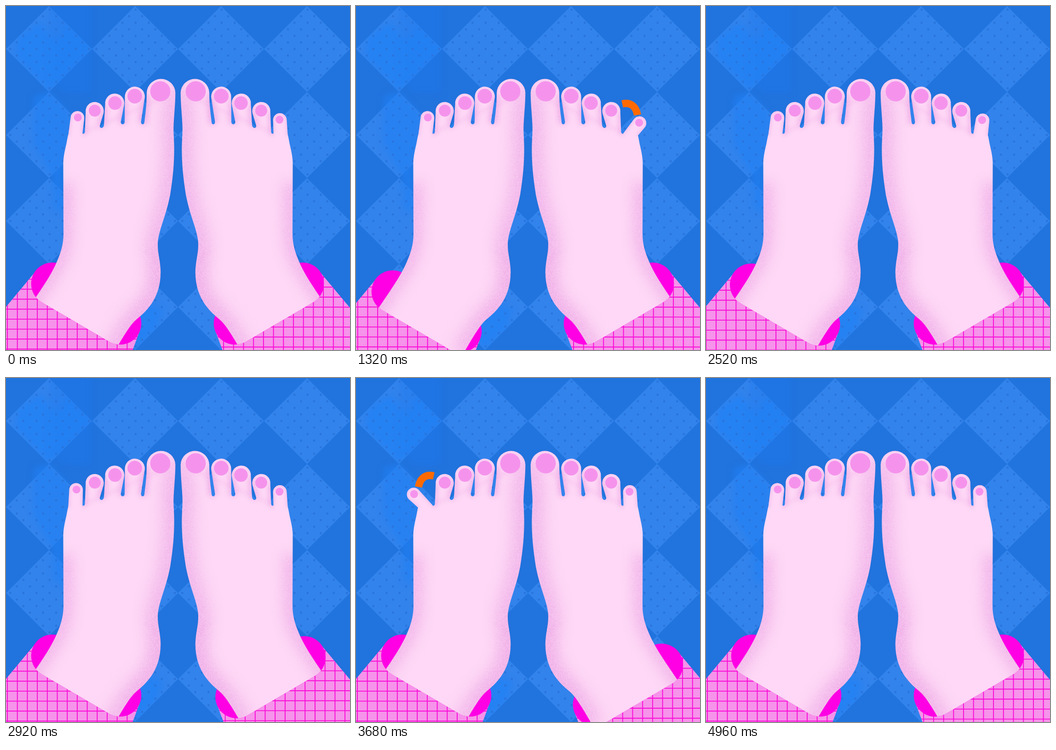
Recreate the animation shown at these times as an HTML page with a canvas. Size 748x748 px, loop 5000 ms.

```html
<!DOCTYPE html>
<html lang="en">
<head>
<meta charset="utf-8">
<title>Toes</title>
<style>
html, body { margin: 0; width: 100%; height: 100%; overflow: hidden; background: #2173dd; }
canvas { display: block; width: 748px; height: 748px; }
</style>
</head>
<body>
<canvas id="stage" width="748" height="748"></canvas>
<script>
const SIZE = 748, LOOP = 5000, TAU = Math.PI * 2, RAD = Math.PI / 180;
const SKIN = '#fed8f6', SHADE = '#eda9e5', NAIL = '#f593ec';
const CLOTH = '#f693ea', LINE = '#fa0ad8', HOT = '#ff00e4', ORANGE = '#ff6a00';
const ctx = document.getElementById('stage').getContext('2d');

// Everything is described for the left foot; the right one is mirrored.
const OUTER = 'M136 279C134 283 133 292 131 301C128 314 125 326 124.5 342' +
  'L125 495C125 520 118 540 108 562C98 584 82 608 65 633L20 700';
const INNER = 'L245 736C258 714 270 694 282 683C300 668 336.3 640 336.3 578' +
  'C336 555 330 540 330 520C330 490 347 462 357 410C363.5 370 365.7 340 365.7 310' +
  'C365.7 290 364 277 364.3 265C365 240 368.3 215 368.3 188';
const TOES = 'A31.2 31.2 0 0 0 306 188C306 215 303 235 301 252' +
  'C301 259 293.5 259 293.5 252L301.3 202A21.7 21.7 0 1 0 258.5 198' +
  'L258 252C258 259 249 259 249.5 252L256.4 217A20.8 20.8 0 1 0 215.7 213' +
  'L213 259C212 267 203 267 204 260L211.8 234A19.7 19.7 0 1 0 173.3 230' +
  'L171.5 274C171 279 166 278 166 276Z';
const BODY = new Path2D(OUTER + 'L20 800L213 790' + INNER + TOES);

// path, width, blur, alpha
const SHADING = [
  ['M126 385L125 495C125 520 118 540 108 562L20 700', 40, 14, .62],
  ['M232 757' + INNER, 48, 16, .66],
  ['M282 683C300 668 336 640 336 578C336 555 330 540 330 520', 42, 16, .3],
  ['M306 195C306 215 303 235 301 256M293.5 252L301 203', 14, 6, .6],
  ['M258.5 205L258 254M249.5 254L256.5 215', 13, 6, .55],
  ['M216 218L213 260M204 260L211.5 231', 13, 6, .55],
  ['M173.5 232L171.5 274L166 276', 11, 5, .5],
  ['M368.3 188' + TOES, 6, 4, .3]
];
const NAILS = [[335.5, 185.5, 22], [280, 196, 16], [237, 211, 14.7], [193, 227.5, 13]];

const sides = [
  { flip: false, r: 49.8, swing: [0, 37], tilt: [-4, 45], shift: 0, pull: [24.3, 19.7], grid: [3, 637.5],
    cuff: [0, 1740, 1740, 2740], toe: [2790, 3450, 4480, 4990], arc: [3120, 3660, 4250, 4700] },
  { flip: true, r: 45.2, swing: [3.7, 31.8], tilt: [0, 38], shift: 2, pull: [26, 26], grid: [12.5, 633],
    cuff: [2500, 4240, 4240, 4990], toe: [340, 1160, 2100, 2740], arc: [340, 1080, 2100, 2540] }
];

const ease = (t, a, b) => (1 - Math.cos(Math.PI * Math.min(1, Math.max(0, (t - a) / (b - a))))) / 2;
const pulse = (t, [a, b, c, d]) => ease(t, a, b) - ease(t, c, d);
const mix = ([a, b], p) => a + (b - a) * p;

function layer(paint) {
  const c = document.createElement('canvas');
  c.width = c.height = SIZE;
  paint(c.getContext('2d'));
  return c;
}

function disc(g, x, y, r, color) {
  g.fillStyle = color;
  g.beginPath();
  g.arc(x, y, r, 0, TAU);
  g.fill();
}

const floor = layer(g => {
  const step = 187, half = 93.5;
  g.fillStyle = '#2173dd';
  g.fillRect(0, 0, SIZE, SIZE);
  const tiles = new Path2D();
  for (let y = half; y < SIZE; y += step)
    for (let x = half; x < SIZE; x += step)
      tiles.addPath(new Path2D(`M${x} ${y - half}l${half} ${half}l${-half} ${half}l${-half} ${-half}z`));
  g.fillStyle = '#3283ec';
  g.fill(tiles);

  // brighter washes of paint
  g.save();
  g.filter = 'blur(7px)';
  g.fillStyle = 'rgba(30,120,240,.35)';
  g.fill(new Path2D('M95 -10H186V190H125L95 160Z'));
  g.fillStyle = 'rgba(32,129,246,.6)';
  g.fill(new Path2D('M60 195L95 187L140 235L135 290L125 340V450L105 440L100 370L60 300Z'));
  g.clip(tiles);
  g.fillStyle = 'rgba(32,130,246,.65)';
  g.fill(new Path2D('M25 65L75 35L110 80L135 40L187 93L93 187L20 110Z'));
  g.fill(new Path2D('M290 640L340 660L330 700L280 748L255 720Z'));
  g.restore();

  const gap = 14.25, dots = new Path2D();
  for (let cy = half; cy < SIZE; cy += step)
    for (let cx = half; cx < SIZE; cx += step)
      for (let j = -6; j <= 6; j++)
        for (let i = -6; i <= 6; i++) {
          if ((i + j) % 2 || Math.abs(i) + Math.abs(j) > 6) continue;
          const x = cx + 1.3 + i * gap, y = cy + j * gap;
          dots.moveTo(x + 2.4, y);
          dots.arc(x, y, 2.4, 0, TAU);
        }
  g.fillStyle = '#2974dc';
  g.fill(dots);
});

const shade = layer(g => {
  g.strokeStyle = SHADE;
  g.lineJoin = 'round';
  for (const [d, width, blur, alpha] of SHADING) {
    g.filter = `blur(${blur}px)`;
    g.globalAlpha = alpha;
    g.lineWidth = width;
    g.stroke(new Path2D(d));
  }
  const img = g.getImageData(0, 0, SIZE, SIZE);
  let seed = 7;
  for (let i = 3; i < img.data.length; i += 4) {
    seed = (seed * 1664525 + 1013904223) >>> 0;
    img.data[i] = Math.min(255, img.data[i] * (.55 + .9 * seed / 4294967296));
  }
  g.putImageData(img, 0, 0);
});

const foot = layer(g => {
  g.fillStyle = SKIN;
  g.fill(BODY);
  g.globalCompositeOperation = 'source-atop';
  g.drawImage(shade, 0, 0);
  for (const [x, y, r] of NAILS) disc(g, x, y, r, NAIL);
});

// The trouser opening is a capsule from A to B.
const A = [101, 604], B = [248, 690], R = 46.3;
const SLOPE = Math.atan2(B[1] - A[1], B[0] - A[0]);
const TROUSER = new Path2D('M66 575L-140 822L250 816L291 706Z');

const reveal = new Path2D();
reveal.moveTo(-500, -300);
reveal.lineTo(1000, -300);
reveal.lineTo(B[0] + 700 * Math.cos(SLOPE), B[1] + 700 * Math.sin(SLOPE));
reveal.arc(...B, R, SLOPE, SLOPE + Math.PI / 2);
reveal.arc(...A, R, SLOPE + Math.PI / 2, SLOPE + Math.PI);
reveal.lineTo(A[0] - 600 * Math.cos(SLOPE), A[1] - 600 * Math.sin(SLOPE));
reveal.closePath();

function drawTrouser([gx, gy]) {
  const gap = 21.7;
  ctx.save();
  ctx.fillStyle = CLOTH;
  ctx.fill(TROUSER);
  ctx.clip(TROUSER);
  ctx.strokeStyle = LINE;
  ctx.lineWidth = 1.9;
  ctx.beginPath();
  for (let i = -7; i < 15; i++) {
    ctx.moveTo(gx + i * gap, 500);
    ctx.lineTo(gx + i * gap, 830);
    ctx.moveTo(-200, gy + i * gap);
    ctx.lineTo(320, gy + i * gap);
  }
  ctx.stroke();
  ctx.restore();
  ctx.strokeStyle = HOT;
  ctx.lineWidth = R * 2;
  ctx.lineCap = 'round';
  ctx.beginPath();
  ctx.moveTo(...A);
  ctx.lineTo(...B);
  ctx.stroke();
  ctx.lineCap = 'butt';
}

function drawLittleToe(side, p) {
  const a = mix(side.swing, p) * RAD, o = mix(side.tilt, p) * RAD;
  const x = 155.4 - side.r * Math.sin(a), y = 293 - side.r * Math.cos(a);
  const edge = new Path2D();
  edge.moveTo(166.3, 276.5);
  edge.arc(x, y, 14.8, -o, -o - Math.PI, true);
  edge.lineTo(135.3, 282);
  const shape = new Path2D(edge);
  shape.lineTo(150, 300);
  shape.closePath();
  ctx.fillStyle = SKIN;
  ctx.fill(shape);
  ctx.save();
  ctx.clip(shape);
  ctx.filter = 'blur(3px)';
  ctx.globalAlpha = .5;
  ctx.strokeStyle = SHADE;
  ctx.lineWidth = 6;
  ctx.stroke(edge);
  ctx.restore();
  disc(ctx, x + .8, y - .8, 8.6, NAIL);
}

// The swoosh that follows the little toe
const SWOOSH = new Path2D('M169 212.7C155 209.5 140 214 136 237');
const SWOOSH_LEN = 47.5;

function drawSwoosh(p) {
  if (p < .01) return;
  ctx.strokeStyle = ORANGE;
  ctx.lineWidth = 15.8;
  ctx.setLineDash([SWOOSH_LEN * p, 200]);
  ctx.stroke(SWOOSH);
  ctx.setLineDash([]);
}

function drawSide(side, t) {
  const q = pulse(t, side.cuff);
  const dx = side.shift - side.pull[0] * q, dy = side.pull[1] * q;
  ctx.save();
  if (side.flip) ctx.transform(-1, 0, 0, 1, SIZE, 0);
  drawSwoosh(pulse(t, side.arc));
  ctx.save();
  ctx.translate(dx, dy);
  drawTrouser(side.grid);
  ctx.clip(reveal);
  ctx.translate(-dx, -dy);
  ctx.drawImage(foot, 0, 0);
  ctx.restore();
  drawLittleToe(side, pulse(t, side.toe));
  ctx.restore();
}

function frame() {
  const t = performance.now() % LOOP;
  ctx.drawImage(floor, 0, 0);
  for (const side of sides) drawSide(side, t);
  requestAnimationFrame(frame);
}
frame();
</script>
</body>
</html>
```
